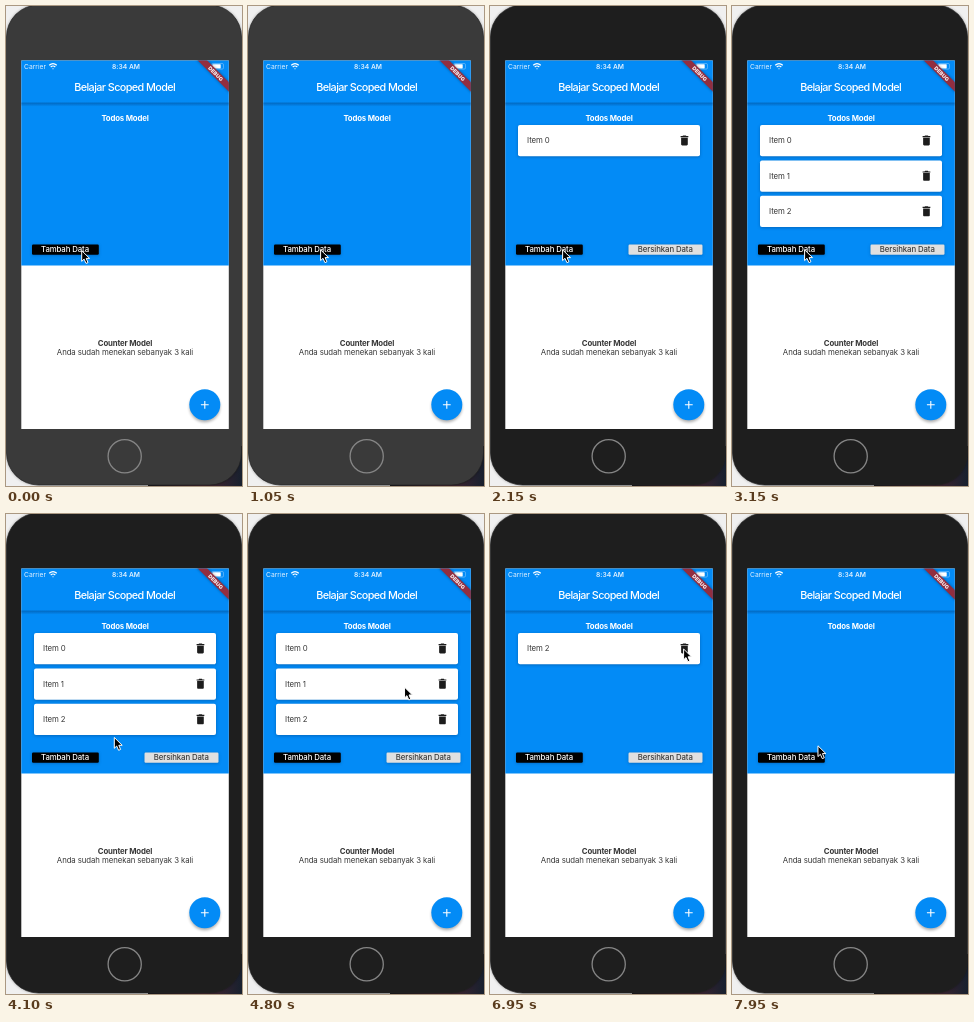
Recreate the animation shown at these times as an HTML page. Size 236 by 480 pixels, loop 8 s.

```html
<!DOCTYPE html>
<html lang="id">
<head>
<meta charset="utf-8">
<title>Belajar Scoped Model</title>
<style>
  html, body { margin: 0; width: 100%; height: 100%; overflow: hidden; background: #fff; }
  svg { display: block; width: 100vw; height: 100vh; }
  text { font: 7.8px Inter, Roboto, sans-serif; letter-spacing: -.08px; fill: #383838; }
  .mid { text-anchor: middle; }
  .white { fill: #fff; }
  .bold { font-weight: 700; letter-spacing: -.16px; }
  .label { font-weight: 500; letter-spacing: -.1px; }
  .title { font-size: 10.8px; font-weight: 500; letter-spacing: -.58px; }
  .status { font-size: 6.7px; letter-spacing: .02px; fill: #e4f2fe; }
  .clock { font-weight: 600; }
  .debug { font-size: 5.3px; font-weight: 900; letter-spacing: 0; fill: #f3e4e6; }
</style>
</head>
<body>
<svg viewBox="0 0 236 480" preserveAspectRatio="none">
  <defs>
    <clipPath id="screen"><rect x="15.3" y="54.4" width="207.5" height="368.6"/></clipPath>
    <linearGradient id="barShade" x2="0" y2="1">
      <stop offset="0" stop-color="#003a78" stop-opacity=".45"/>
      <stop offset="1" stop-color="#003a78" stop-opacity="0"/>
    </linearGradient>
    <linearGradient id="desk">
      <stop offset="0" stop-color="#15161c"/>
      <stop offset=".6" stop-color="#4a2632"/>
      <stop offset="1" stop-color="#17202e"/>
    </linearGradient>
    <filter id="soft" x="-30%" y="-30%" width="160%" height="160%">
      <feGaussianBlur stdDeviation="1.6"/>
    </filter>
    <path id="trash" transform="translate(187.8 127.8) scale(.555)"
      d="M6 19c0 1.1.9 2 2 2h8c1.1 0 2-.9 2-2V7H6zM19 4h-3.5l-1-1h-5l-1 1H5v2h14z" fill="#1c1c1c"/>
  </defs>

  <rect width="236" height="480" fill="#f0f0f0"/>
  <rect x="142" y="440" width="94" height="40" fill="url(#desk)"/>
  <rect x=".5" y="-1" width="235" height="480" rx="32" opacity=".4" filter="url(#soft)"/>
  <rect id="bezel" x=".5" y="-1" width="235" height="480" rx="32" stroke="#222" stroke-width=".7"/>
  <circle cx="118.7" cy="450.3" r="16.6" fill="none" stroke="#858585" stroke-width="1.3"/>

  <g clip-path="url(#screen)">
    <rect x="15" y="54" width="208" height="369" fill="#fff"/>
    <rect x="15" y="54" width="208" height="205.5" fill="#038bf6"/>
    <rect x="15" y="96.6" width="208" height="4" fill="url(#barShade)"/>

    <text class="status" x="18" y="62.8">Carrier</text>
    <g fill="none" stroke="#fff" stroke-width="1.2">
      <path d="M43.2 59.3q3.8-3.4 7.6 0M44.7 61q2.3-2 4.6 0"/>
      <path d="M46 62.6h2L47 63.6z" fill="#fff" stroke="none"/>
    </g>
    <text class="status clock mid" x="120" y="62.8">8:34 AM</text>
    <rect x="205.5" y="57.5" width="12" height="5.6" rx="1.3" fill="none" stroke="#fff" stroke-width=".5" opacity=".6"/>
    <rect x="206.3" y="58.2" width="8.4" height="4.2" rx=".6" fill="#fff"/>
    <text class="title mid white" x="118.7" y="85">Belajar Scoped Model</text>

    <text class="bold mid white" x="119" y="115">Todos Model</text>
    <g id="cards"></g>

    <rect x="26" y="239" width="67" height="10.4" rx="1.2" fill="#003a78" opacity=".4" filter="url(#soft)"/>
    <rect x="26" y="238.5" width="66.8" height="10.2" rx="1.2" fill="#000"/>
    <text class="label mid white" x="59" y="246.2">Tambah Data</text>
    <g id="clear">
      <rect x="138.5" y="239" width="74" height="10.4" rx="1.2" fill="#003a78" opacity=".4" filter="url(#soft)"/>
      <rect x="138.5" y="238.5" width="74" height="10.2" rx="1.2" fill="#e0e0e0"/>
      <text class="label mid" x="175.3" y="246.2">Bersihkan Data</text>
    </g>

    <text class="bold mid" x="119" y="339.6">Counter Model</text>
    <text class="mid" x="119" y="349">Anda sudah menekan sebanyak 3 kali</text>

    <circle cx="198.8" cy="401" r="15.2" opacity=".32" filter="url(#soft)"/>
    <circle cx="198.8" cy="398.8" r="15.5" fill="#038bf6"/>
    <path d="M194.9 398.8h7.8M198.8 394.9v7.8" stroke="#fff" stroke-width="1.1"/>

    <g transform="translate(223 54.3) rotate(45)">
      <rect x="-24" y="15.5" width="48" height="6.7" opacity=".35" filter="url(#soft)"/>
      <rect x="-24" y="15.5" width="48" height="6.7" fill="#922e40"/>
      <text class="debug mid" y="20.8">DEBUG</text>
    </g>
  </g>

  <path id="cursor" d="M0 0V10.8L2.4 8.5L4.3 12.8L6.3 12L4.5 7.8H7.9Z"
    fill="#000" stroke="#fff" stroke-width="1" stroke-linejoin="round"/>
</svg>
<script>
  const LOOP = 8000, PITCH = 35.4, FOCUS = 1350;
  const ADDED = [1850, 2450, 3050];
  const REMOVED = [5850, 6500, 7250];
  // time, x, y of the pointer tip
  const PATH = [
    [0, 75.7, 244.6], [300, 75.7, 244.6], [900, 72.6, 243.8], [3650, 72.6, 243.8],
    [4100, 108.3, 223.5], [4350, 112, 219], [5200, 193.6, 135],
    [7450, 193.6, 135], [8000, 83.5, 234]
  ];

  const $ = id => document.getElementById(id);
  const show = (el, on) => el.setAttribute('display', on ? 'inline' : 'none');
  const ease = u => u * u * (3 - 2 * u);

  $('cards').innerHTML = ADDED.map((_, i) => `<g>
    <rect x="28" y="120" width="182" height="31" rx="2" fill="#003a78" opacity=".5" filter="url(#soft)"/>
    <rect x="28" y="119" width="182" height="31.3" rx="2" fill="#fff"/>
    <text x="37" y="137.4">Item ${i}</text>
    <use href="#trash"/></g>`).join('');
  const cards = [...$('cards').children];

  function pointer(t) {
    const i = PATH.findIndex(p => p[0] > t);
    const [t0, x0, y0] = PATH[i - 1], [t1, x1, y1] = PATH[i];
    const u = ease((t - t0) / (t1 - t0));
    return [x0 + (x1 - x0) * u, y0 + (y1 - y0) * u];
  }

  function draw(t) {
    let row = 0;
    cards.forEach((card, i) => {
      const on = t >= ADDED[i] && t < REMOVED[i];
      show(card, on);
      if (on) card.setAttribute('transform', `translate(0 ${PITCH * row++})`);
    });
    show($('clear'), row > 0);
    $('bezel').setAttribute('fill', t < FOCUS ? '#3a3a3a' : '#1e1e1e');
    $('cursor').setAttribute('transform', `translate(${pointer(t)})`);
  }

  const start = performance.now();
  function tick() {
    draw((performance.now() - start) % LOOP);
    requestAnimationFrame(tick);
  }
  tick();
</script>
</body>
</html>
```
